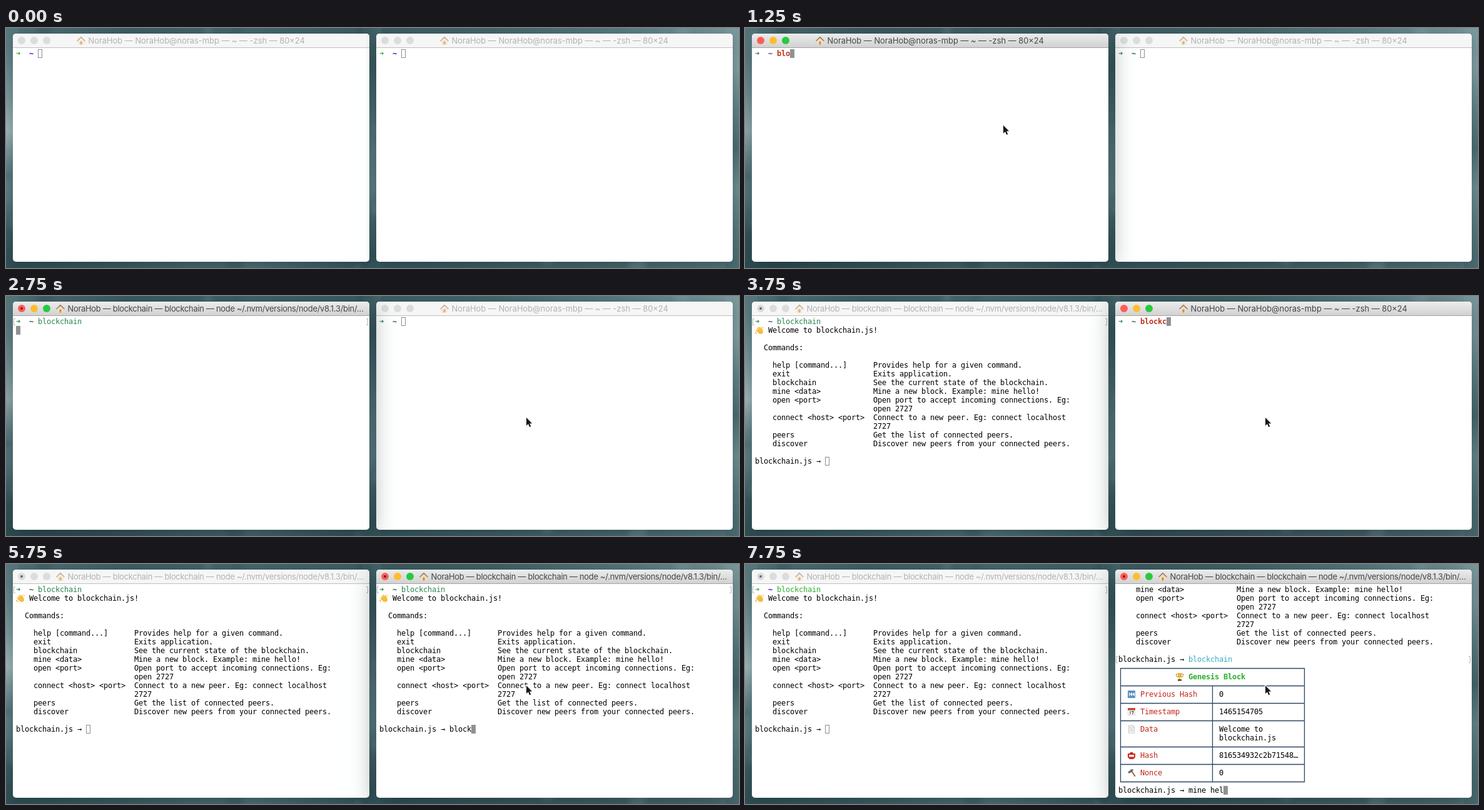
Write an HTML page with a canvas that moves like this. It is 1172 by 385 pixels and loops after 8000 ms.

```html
<!DOCTYPE html>
<html lang="en">
<head>
<meta charset="utf-8">
<title>Two terminals</title>
<style>
  html, body { margin: 0; width: 100%; height: 100%; overflow: hidden; background: #4a6a6f; }
  canvas { display: block; }
</style>
</head>
<body>
<canvas id="stage" width="1172" height="385"></canvas>
<script>
const W = 1172, H = 385, LOOP = 8000, STEP = 250;
const CELL = 7, LINE = 14, LEFT = 16, TOP = 34;
const ctx = document.getElementById('stage').getContext('2d');

const MONO = '12px "DejaVu Sans Mono", monospace';
const UI = '12.9px Inter, sans-serif';
ctx.font = MONO;
const monoSpacing = CELL - ctx.measureText('0').width + 'px';

const SHELL_TITLE = 'NoraHob — NoraHob@noras-mbp — ~ — -zsh — 80×24';
const NODE_TITLE = 'NoraHob — blockchain — blockchain — node ~/.nvm/versions/node/v8.1.3/bin/…';
const REPL = 'blockchain.js → ';
const HELP = `
   Welcome to blockchain.js!

  Commands:

    help [command...]      Provides help for a given command.
    exit                   Exits application.
    blockchain             See the current state of the blockchain.
    mine <data>            Mine a new block. Example: mine hello!
    open <port>            Open port to accept incoming connections. Eg:
                           open 2727
    connect <host> <port>  Connect to a new peer. Eg: connect localhost
                           2727
    peers                  Get the list of connected peers.
    discover               Discover new peers from your connected peers.
`.split('\n');

// Small pictograms in a 14 x 14 box: [colour, path]
const ICONS = {
  house: [['#f0dfbd', 'M2.5 7H11.5V13.5H2.5Z'], ['#a9794f', 'M7 .5L14 7.5L13 8.5L7 3L1 8.5L0 7.5Z'],
    ['#d08a3e', 'M5.5 8.5H8.5V13.5H5.5Z']],
  hand: [['#f6bd3c', 'M3 4L4.5 3L7 6L5 2L6.5 1L9.5 5L8.5 2L10 1.5L12 6L13 9Q13 13 9 13Q6 13 4 10L1 7L2 6L4 7Z'],
    ['#d9972b', 'M0 10L1 9.5L3 12.5L2 13ZM11 0L14 3L13.5 4Z']],
  trophy: [['#c98f25', 'M1 2H13V5Q12 8 9 8H5Q2 8 1 5ZM2 3V5L4 7V3ZM12 3V5L10 7V3Z'],
    ['#e5b440', 'M4 1H10V6Q9 9 7 9Q5 9 4 6ZM6 8H8V11H6Z'], ['#5f4128', 'M4 11H10V13.5H4Z']],
  previous: [['#5b8fc0', 'M2 1H12Q13 1 13 2V12Q13 13 12 13H2Q1 13 1 12V2Q1 1 2 1Z'],
    ['#fff', 'M3 4H4V10H3ZM8 4V10L4 7ZM12 4V10L8 7Z']],
  calendar: [['#d5d5d5', 'M1 1H13V13H1Z'], ['#fafafa', 'M2 5H12V12H2Z'], ['#cf4335', 'M1 1H13V4.5H1Z'],
    ['#333', 'M4 6.5L5.5 6V11H4.5V7H4ZM7 6H10.5V7L9 11H8L9.3 7H7Z']],
  page: [['#c9c9c9', 'M2 .5H9L12 4V13.5H2Z'], ['#f7f7f7', 'M3 1.5H8.5V4.5H11V12.5H3Z'],
    ['#b5b5b5', 'M4 4H7V5H4ZM4 6.5H10V7.2H4ZM4 9H10V9.7H4Z']],
  badge: [['#c9291f', 'M1 4H4L5 2H9L10 4H13V10L10 13H4L1 10Z'], ['#f7e9e4', 'M3 6H11V9.5H3Z']],
  hammer: [['#9a6a3c', 'M6 4L7.5 3L13.5 12L12 13.5Z'], ['#6d6d6d', 'M1 6L7 1L10 1.5L8.5 5L3 8Z']],
};

const TABLE = [
  [12, 'previous', 'Previous Hash', ['0']],
  [14, 'calendar', 'Timestamp', ['1465154705']],
  [16, 'page', 'Data', ['Welcome to', 'blockchain.js']],
  [19, 'badge', 'Hash', ['816534932c2b71548…']],
  [21, 'hammer', 'Nonce', ['0']],
];

function rect(color, x, y, w, h) {
  ctx.fillStyle = color;
  ctx.fillRect(x, y, w, h);
}

function disc(color, x, y, r) {
  ctx.fillStyle = color;
  ctx.beginPath();
  ctx.arc(x, y, r, 0, 7);
  ctx.fill();
}

function icon(name, x, y) {
  ctx.save();
  ctx.translate(x, y);
  for (const [color, path] of ICONS[name]) {
    ctx.fillStyle = color;
    ctx.fill(new Path2D(path), 'evenodd');
  }
  ctx.restore();
}

function put(col, row, text, color = '#000', bold = false) {
  ctx.font = (bold ? 'bold ' : '') + MONO;
  ctx.letterSpacing = monoSpacing;
  ctx.fillStyle = color;
  ctx.fillText(text, LEFT + col * CELL, TOP + 11 + row * LINE);
}

const rowIcon = (name, col, row) => icon(name, LEFT + col * CELL, TOP + row * LINE);

function cursor(col, row, active) {
  const x = LEFT + col * CELL, y = TOP + row * LINE;
  if (active) return rect('#8e9294', x, y, CELL, LINE);
  ctx.strokeStyle = '#8a8f90';
  ctx.lineWidth = 1;
  ctx.strokeRect(x + .5, y + .5, CELL - 1, LINE - 1);
}

// Brackets that mark a finished command line
function marks(row) {
  const y = TOP + row * LINE + 2.5;
  ctx.strokeStyle = '#b4b4b4';
  ctx.lineWidth = 1;
  ctx.stroke(new Path2D(`M15 ${y}H12.5V${y + 10}H15M576 ${y}H578.5V${y + 10}H576`));
}

function gradient(x0, y0, x1, y1, colors) {
  const g = ctx.createLinearGradient(x0, y0, x1, y1);
  colors.forEach((c, i) => g.addColorStop(i / (colors.length - 1), c));
  return g;
}

function wallpaper() {
  rect(gradient(0, 0, W, 0, ['#547479', '#3e5e63', '#45666b', '#3d5d62', '#456569', '#587a7f', '#7b999d']), 0, 0, W, 20);
  rect(gradient(0, 0, W, 0, ['#2f4d52', '#3b5a5f', '#4d6d72', '#34535a', '#3d5c61', '#476669', '#547479']), 0, 365, W, 20);
  rect(gradient(0, 0, 0, H, ['#56767b', '#67878c', '#7d9a9e', '#a0b6b9', '#648489', '#5a7a7f', '#3a595e', '#2f4d52']), 0, 0, 20, H);
  rect(gradient(0, 0, 0, H, ['#45656a', '#3d5d62', '#4d6d72', '#5d7d82', '#62858a', '#45656a', '#35555a']), 570, 0, 30, H);
  rect(gradient(0, 0, 0, H, ['#7b999d', '#84a0a4', '#62858a', '#4d6d72', '#6f8f93', '#587a7f', '#4a6a6f']), 1150, 0, 22, H);
  let seed = 7;
  const random = () => (seed = seed * 16807 % 2147483647) / 2147483647;
  ctx.filter = 'blur(4px)';
  for (let i = 0; i < 110; i++) {
    const shade = random() < .5 ? 'rgba(30,60,66,.22)' : 'rgba(160,190,194,.2)';
    disc(shade, random() * W, random() * H, 5 + random() * 9);
  }
  ctx.filter = 'none';
}

function frame(active, running) {
  ctx.save();
  ctx.shadowColor = active ? 'rgba(0,15,20,.42)' : 'rgba(0,15,20,.3)';
  ctx.shadowBlur = active ? 42 : 20;
  ctx.shadowOffsetY = active ? 8 : 4;
  ctx.fillStyle = '#fff';
  ctx.beginPath();
  ctx.roundRect(11, 9, 570, 366, 5);
  ctx.fill();
  ctx.restore();
  ctx.fillStyle = active ? gradient(0, 9, 0, 31, ['#ececec', '#d2d2d2']) : '#f6f6f6';
  ctx.beginPath();
  ctx.roundRect(11, 9, 570, 22, [5, 5, 0, 0]);
  ctx.fill();
  rect(active ? '#a5a3a3' : '#bfbfbf', 11, 31, 570, 1);

  ['#ff5f57', '#ffbd2e', '#28c940'].forEach((c, i) => disc(active ? c : '#dcdcdc', 25 + 20 * i, 20, 6));
  if (running) disc(active ? '#7d1512' : '#6a6a6a', 25, 20, 2);

  const x = running ? 80 : 113;
  ctx.globalAlpha = active ? 1 : .6;
  icon('house', x, 13);
  ctx.globalAlpha = 1;
  ctx.font = UI;
  ctx.letterSpacing = running ? '-0.26px' : '0px'; // truncated titles are set tighter
  ctx.fillStyle = active ? '#434648' : '#b2b2b2';
  ctx.fillText(running ? NODE_TITLE : SHELL_TITLE, x + 18.5, 25);
}

function table() {
  ctx.strokeStyle = '#2b4560';
  ctx.lineWidth = 1.3;
  const lines = [195.5, 223.5, 251.5, 293.5, 321.5].map(y => `M19.5 ${y}H313.5`).join('');
  ctx.stroke(new Path2D('M19.5 167.5H313.5V349.5H19.5Z M166.5 195.5V349.5' + lines));
  rowIcon('trophy', 13, 10);
  put(16, 10, 'Genesis Block', '#2bb02b', true);
  for (const [row, name, label, values] of TABLE) {
    rowIcon(name, 2, row);
    put(5, row, label, '#bf2a1c');
    values.forEach((value, i) => put(23, row + i, value));
  }
}

function terminal({ x, active, running, help, mined, command, input, muted }) {
  ctx.save();
  ctx.translate(x, 0);
  frame(active, running);
  const scroll = mined ? 8 : 0;
  if (!mined) {
    const green = muted ? '#2c8450' : '#2bb02b';
    put(0, 0, '➜', green, true);
    put(3, 0, '~', muted ? '#35525c' : '#3a10d0', true);
    const done = command === 'blockchain';
    put(5, 0, command, done ? green : '#bf3524', !done);
    if (running) marks(0);
    if (help) rowIcon('hand', 0, 1);
  }
  if (help) {
    HELP.slice(scroll).forEach((text, row) => put(0, row, text));
    const row = 16 - scroll;
    put(0, row, REPL);
    if (mined) {
      put(16, row, 'blockchain', '#36abc0');
      marks(row);
      table();
      put(0, 23, REPL);
    }
    const last = mined ? 23 : row;
    put(16, last, input, input === 'blockchain' ? '#36abc0' : '#000');
    cursor(16 + input.length, last, active);
  } else if (running) {
    cursor(0, 1, active);
  } else {
    cursor(5 + command.length, 0, active);
  }
  ctx.restore();
}

function pointer(step) {
  if (step < 1) return;
  const mix = (a, b, from, to) => a + (b - a) * Math.min(1, Math.max(0, (step - from) / (to - from)));
  const x = step < 9 ? mix(470, 413, 1, 4) : mix(413, 832, 8, 11);
  const y = step < 9 ? mix(320, 156, 1, 4) : mix(156, 195, 8, 11);
  ctx.save();
  ctx.translate(x, y);
  const arrow = new Path2D('M0 0V13L3 10.3L5.2 15.2L7.3 14.3L5.2 9.5H9.2Z');
  ctx.strokeStyle = '#fff';
  ctx.lineWidth = 2;
  ctx.stroke(arrow);
  ctx.fillStyle = '#16191c';
  ctx.fill(arrow);
  ctx.restore();
}

function typed(text, step, start, rate = 2.5) {
  return step < start ? '' : text.slice(0, Math.floor(1 + (step - start) * rate));
}

function draw(step) {
  const muted = step >= 4 && step < 26, mined = step >= 26;
  wallpaper();
  const left = {
    x: 0, active: step >= 3 && step < 12, running: step >= 9, help: step >= 12,
    command: typed('blockchain', step, 4), input: '', muted,
  };
  const right = {
    x: 581, active: step >= 12, running: step >= 18, help: step >= 19, mined,
    command: typed('blockchain', step, 13),
    input: mined ? typed('mine hel', step, 28) : typed('blockchain', step, 21, 2.25), muted,
  };
  // The active window is on top, so its shadow falls on the other one
  (left.active ? [right, left] : [left, right]).forEach(terminal);
  pointer(step);
}

let shown = -1;
function tick() {
  const step = Math.floor(performance.now() % LOOP / STEP);
  if (step !== shown) draw(shown = step);
  requestAnimationFrame(tick);
}
tick();
</script>
</body>
</html>
```
